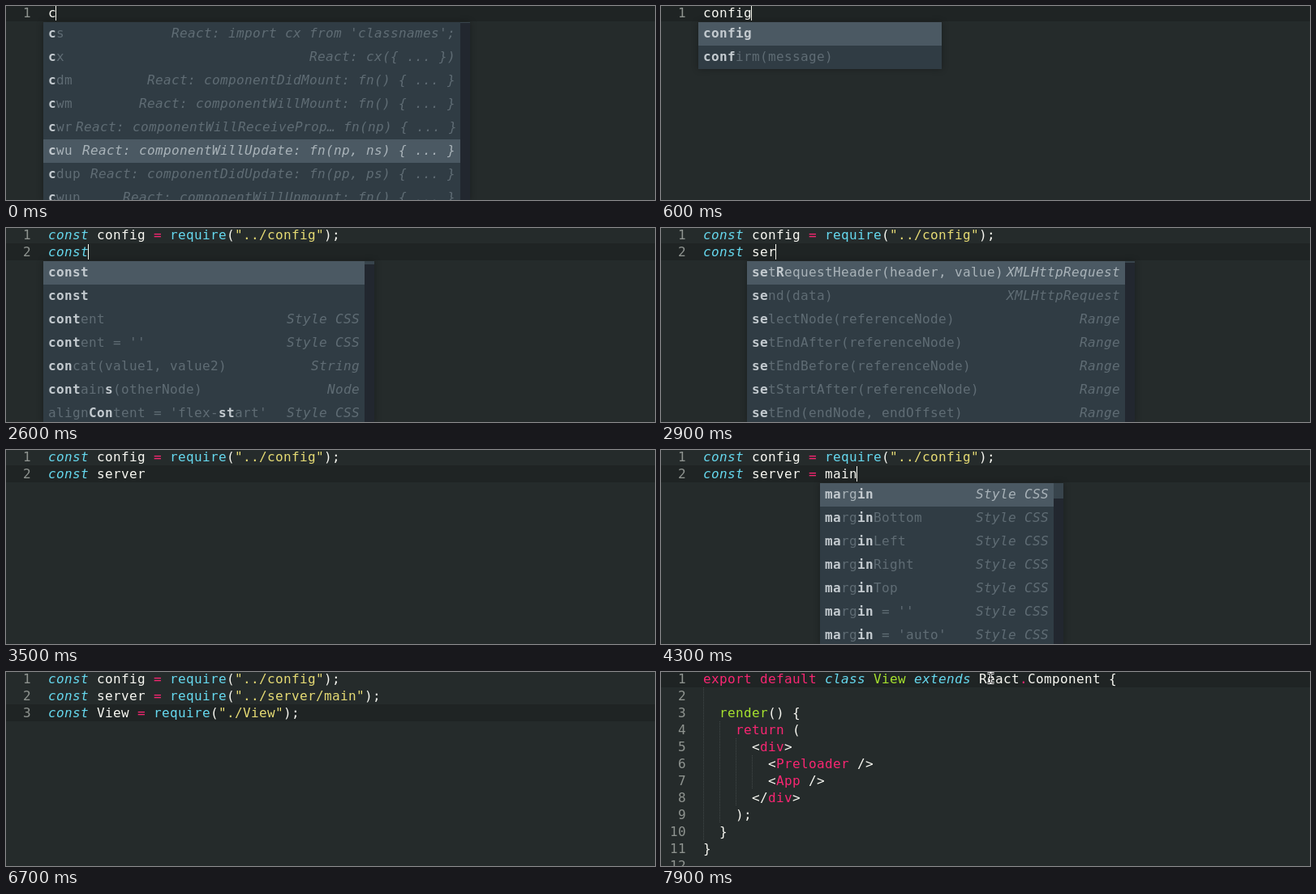
These frames come from a looping animation (800 px wide and 240 px high, 8 s). An HTML page with a canvas:

```html
<!DOCTYPE html>
<html lang="en">
<head>
<meta charset="utf-8">
<title>Editor completion</title>
<style>
html, body { margin: 0; width: 100%; height: 100%; overflow: hidden; background: #252b2b; }
canvas { display: block; }
</style>
</head>
<body>
<canvas id="stage" width="800" height="240"></canvas>
<script>
const ctx = document.getElementById('stage').getContext('2d');
const LOOP = 8000, CHAR = 10, LINE = 21, ROW = 29, LEFT = 52;
const WHITE = '#f8f8f2', PINK = '#f92672', CYAN = '#66d9ef', GREEN = '#a6e22e', YELLOW = '#e6db74';

const line1 = 'const config = require("../config");';
const line2 = 'const server = require("../server/main");';
const line3 = 'const View = require("./View");';
const view = `export default class View extends React.Component {

  render() {
    return (
      <div>
        <Preloader />
        <App />
      </div>
    );
  }
}
`.split('\n');

// Menu rows are "name|label"; matched letters stand between asterisks.
const match = (rows, n) => rows.map(r => {
  r = r.replace(/\*/g, '');
  return `*${r.slice(0, n)}*${r.slice(n)}`;
});
// thumb 0 means a short list without a scrollbar
const menu = (col, line, width, rows, thumb = 2, selected = 0) =>
  ({ col, line, width, rows, thumb, selected });

const snippets = match([
  "cs|React: import cx from 'classnames';",
  'cx|React: cx({ ... })',
  'cdm|React: componentDidMount: fn() { ... }',
  'cwm|React: componentWillMount: fn() { ... }',
  'cwr|React: componentWillReceiveProp… fn(np) { ... }',
  'cwu|React: componentWillUpdate: fn(np, ns) { ... }',
  'cdup|React: componentDidUpdate: fn(pp, ps) { ... }',
  'cwun|React: componentWillUnmount: fn() { ... }'
], 1);
const constRows = [
  '*const*', '*const*', '*cont*ent|Style CSS', "*cont*ent = ''|Style CSS",
  '*con*cat(value1, value2)|String', '*cont*ain*s*(otherNode)|Node',
  "align*Con*tent = 'flex-*st*art'|Style CSS"
];
const setRows = [
  '*se*t*R*equestHeader(header, value)|XMLHttpRequest', '*se*nd(data)|XMLHttpRequest',
  '*se*lectNode(referenceNode)|Range', '*se*tEndAfter(referenceNode)|Range',
  '*se*tEndBefore(referenceNode)|Range', '*se*tStartAfter(referenceNode)|Range',
  '*se*tEnd(endNode, endOffset)|Range'
];
const marginRows = ['', 'Bottom', 'Left', 'Right', 'Top', " = ''", " = 'auto'"]
  .map(end => `*ma*rg*in*${end}|Style CSS`);
const deRows = match([
  'default|(View.jsx)', 'description-Array', 'description-String',
  'description-Blob()', 'devicelight|Event', 'devicemotion|Event'
], 2);
const defaultRows = ['default|(View.jsx)', 'default', 'defaultValue', 'defaultChecked', 'defaultView'];

const coMenu = (line, n) => menu(0, line, 396, match(constRows, n), 4);
const configMenu = menu(0, 0, 300, ['*config*', '*conf*irm(message)'], 0);
const wideSet = menu(6, 1, 514, setRows);
const marginMenu = n => menu(15, 1, 288, n ? match(marginRows, n) : marginRows, 19);
const defaultMenu = n => menu(0, 2, 300, match(defaultRows, n), 0);

// [time, text of the current line, line index, menu, caret opacity]
const steps = [
  [0, 'c', 0, menu(0, 0, 514, snippets, 1, 5)],
  [100, 'co', 0, coMenu(0, 2)],
  [200, 'con', 0, coMenu(0, 3)],
  [300, 'conf', 0, coMenu(0, 3)],
  [400, 'confi', 0, configMenu],
  [500, 'config', 0, configMenu],
  [900, 'config', 0],
  [1600, line1, 0],
  [1900, '', 1],
  [2200, 'c', 1, coMenu(1, 1)],
  [2300, 'co', 1, coMenu(1, 2)],
  [2400, 'con', 1, coMenu(1, 3)],
  [2500, 'cons', 1, coMenu(1, 3)],
  [2600, 'const', 1, menu(0, 1, 396, constRows, 4)],
  [2700, 'const ', 1],
  [2800, 'const se', 1, wideSet],
  [2900, 'const ser', 1, menu(6, 1, 466, setRows)],
  [3100, 'const serv', 1, wideSet],
  [3300, 'const serve', 1, wideSet],
  [3400, 'const server', 1],
  [3500, 'const server ', 1, null, 0],
  [3700, 'const server = ', 1],
  [3900, 'const server = m', 1, marginMenu(1)],
  [4000, 'const server = ma', 1, marginMenu(2)],
  [4100, 'const server = mai', 1, marginMenu(2)],
  [4200, 'const server = main', 1, marginMenu()],
  [4500, line2, 1],
  [4700, line2, 1, null, 0],
  [4900, '', 2],
  [5300, '', 2, null, 0],
  [5600, '', 2],
  [5800, 'd', 2, menu(0, 2, 288, match(deRows, 1))],
  [5900, 'de', 2, menu(0, 2, 288, deRows)],
  [6000, 'def', 2, defaultMenu(3)],
  [6100, 'defa', 2, defaultMenu(4)],
  [6400, line3, 2],
  [6700, line3, 2, null, 0],
  [6900, line3, 2, null, .35],
  [7000, line3, 2, null, .7],
  [7100, line3, 2]
];

function rect(x, y, w, h, color) {
  ctx.fillStyle = color;
  ctx.fillRect(x, y, w, h);
}

function text(str, x, y, color, style = '') {
  ctx.font = `${style} 16px "DejaVu Sans Mono", monospace`;
  ctx.fillStyle = color;
  [...str].forEach((c, i) => ctx.fillText(c, x + i * CHAR, y));
}

const syntax = [
  [/^".*?"/, YELLOW],
  [/^(const|class|extends)\b/, CYAN, 'italic'],
  [/^require\b/, CYAN],
  [/^(export|default|return|div|Preloader|App)\b/, PINK],
  [/^[=.]/, PINK],
  [/^render\b/, GREEN],
  [/^\w+|^\s+|^./, WHITE]
];

function code(str, line) {
  let col = 0;
  while (col < str.length) {
    const rest = str.slice(col);
    let [re, color, style] = syntax.find(s => s[0].test(rest));
    const word = rest.match(re)[0];
    if (str.slice(0, col).endsWith('class ')) color = GREEN;
    text(word, LEFT + col * CHAR, 14 + line * LINE, color, style);
    col += word.length;
  }
}

function editor(lines, active) {
  rect(0, 0, 800, 240, '#252b2b');
  rect(0, active * LINE - 2, 800, LINE, '#1f2424');
  lines.forEach((str, i) => {
    const num = String(i + 1);
    text(num, 31 - num.length * CHAR, 14 + i * LINE, '#8f9490');
    code(str, i);
  });
}

function caret(col, line, alpha) {
  ctx.globalAlpha = alpha;
  rect(51 + col * CHAR, line * LINE - 1, 1, 19, '#f8f8f0');
  ctx.globalAlpha = 1;
}

function drawMenu({ col, line, width, rows, thumb, selected }) {
  const x = 46 + col * CHAR, top = 20 + line * LINE;
  const h = thumb ? 240 - top : rows.length * ROW;
  ctx.save();
  ctx.shadowColor = 'rgba(0,0,0,.3)';
  ctx.shadowBlur = 8;
  rect(x, top, width + (thumb ? 12 : 0), h, '#303c44');
  ctx.restore();
  if (thumb) {
    rect(x + width, top, 12, h, '#22272f');
    rect(x + width, top, 12, thumb, '#38444c');
  }
  rows.forEach((row, i) => {
    const on = i === selected, y = top + i * ROW;
    const dim = on ? '#a9b3b9' : '#5f6c74';
    if (on) rect(x, y, width, ROW, '#4b5963');
    const [name, label = ''] = row.split('|');
    let pen = x + 6;
    name.split('*').forEach((part, k) => {
      text(part, pen, y + 19, k % 2 ? '#c3cacf' : dim, k % 2 ? 'bold' : '');
      pen += part.length * CHAR;
    });
    text(label, Math.max(x + width - 6 - label.length * CHAR, pen + 4), y + 19, dim, 'italic');
  });
}

function guides() {
  ctx.strokeStyle = '#414848';
  ctx.lineWidth = 1;
  ctx.setLineDash([1, 1]);
  [[1, 10], [3, 9], [4, 8], [5, 7]].forEach(([from, to], i) => {
    const x = LEFT + i * 20 + .5;
    ctx.beginPath();
    ctx.moveTo(x, from * LINE - 2);
    ctx.lineTo(x, to * LINE - 2);
    ctx.stroke();
  });
  ctx.setLineDash([]);
}

function pointer(x, y) {
  const beam = new Path2D('M-4 -6H-1L0 -5L1 -6H4M0 -5V5M-4 6H-1L0 5L1 6H4M-2 1H2');
  ctx.save();
  ctx.translate(x + .5, y + .5);
  for (const [w, color] of [[3, '#fff'], [1, '#000']]) {
    ctx.lineWidth = w;
    ctx.strokeStyle = color;
    ctx.stroke(beam);
  }
  ctx.restore();
}

function draw(t) {
  if (t >= 7300) {
    editor(view, 0);
    guides();
    if (t < 7700) caret(0, 0, 1);
    if (t >= 7500) {
      const p = Math.min(1, Math.floor((t - 7500) / 100) / 4);
      const ease = p * p * (3 - 2 * p);
      pointer(460 - 54 * ease, 131 - 124 * ease);
    }
    return;
  }
  const [, str, line, list, alpha = 1] = steps.findLast(s => s[0] <= t);
  editor([...[line1, line2].slice(0, line), str], line);
  caret(str.length, line, alpha);
  if (list) drawMenu(list);
}

const start = performance.now();
function tick(now) {
  draw(Math.max(0, now - start) % LOOP);
  requestAnimationFrame(tick);
}
draw(0);
requestAnimationFrame(tick);
</script>
</body>
</html>
```
